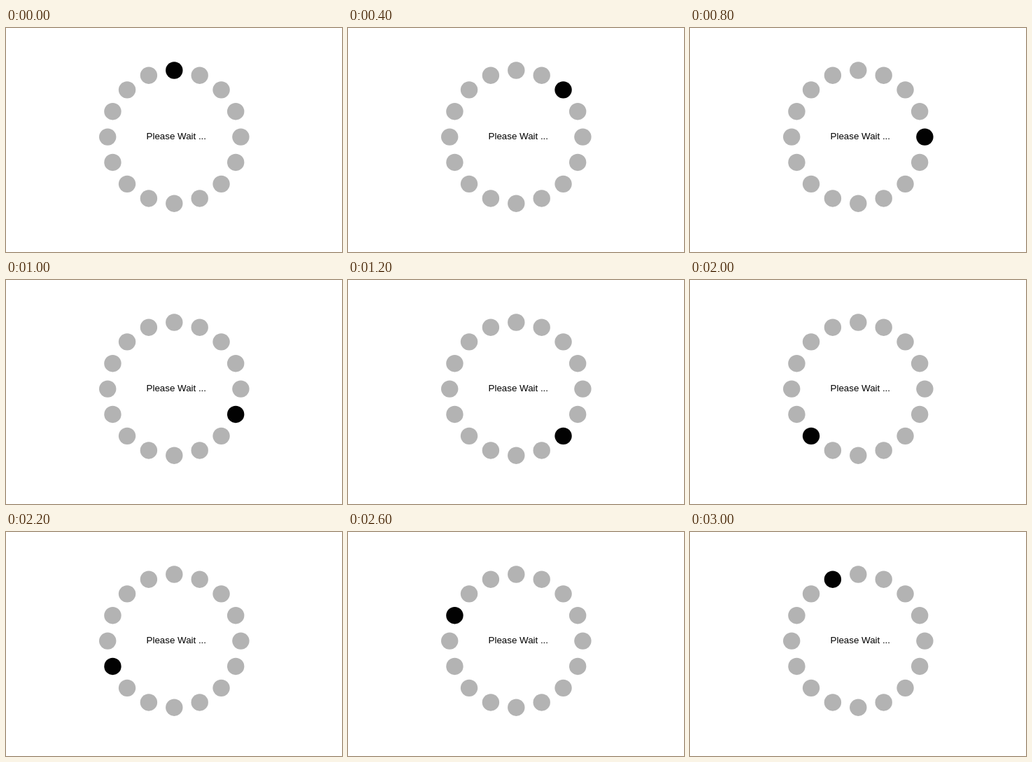
An HTML page for the animation above (3200 ms loop, 480 px wide and 320 px high).

```html
<!DOCTYPE html>
<html lang="en">
<head>
<meta charset="utf-8">
<title>Please Wait</title>
<style>
  html, body { margin: 0; width: 100%; height: 100%; overflow: hidden; background: #fff; }
  svg { display: block; width: 480px; height: 320px; }
  text { font: 13.33px "Liberation Sans", Arial, sans-serif; fill: #000; }
</style>
</head>
<body>
<svg viewBox="0 0 480 320">
  <g id="ring"></g>
  <text x="200.6" y="159">Please Wait ...</text>
</svg>
<script>
  const COUNT = 16;
  const STEP = 200;
  const CENTRE = { x: 240.3, y: 155.6 };
  const RING_RADIUS = 95.1;
  const DOT_RADIUS = 12.2;
  const REST = "#b3b3b3";
  const ACTIVE = "#020202";

  const ring = document.getElementById("ring");

  // Dots run clockwise from the top
  const dots = Array.from({ length: COUNT }, (_, i) => {
    const angle = i / COUNT * 2 * Math.PI;
    const dot = document.createElementNS("http://www.w3.org/2000/svg", "circle");
    dot.setAttribute("cx", CENTRE.x + RING_RADIUS * Math.sin(angle));
    dot.setAttribute("cy", CENTRE.y - RING_RADIUS * Math.cos(angle));
    dot.setAttribute("r", DOT_RADIUS);
    return ring.appendChild(dot);
  });

  const start = performance.now();

  function draw(now) {
    const elapsed = Math.max(0, now - start);
    const current = Math.floor(elapsed / STEP) % COUNT;
    dots.forEach((dot, i) => dot.setAttribute("fill", i === current ? ACTIVE : REST));
    requestAnimationFrame(draw);
  }
  draw(start);
</script>
</body>
</html>
```
